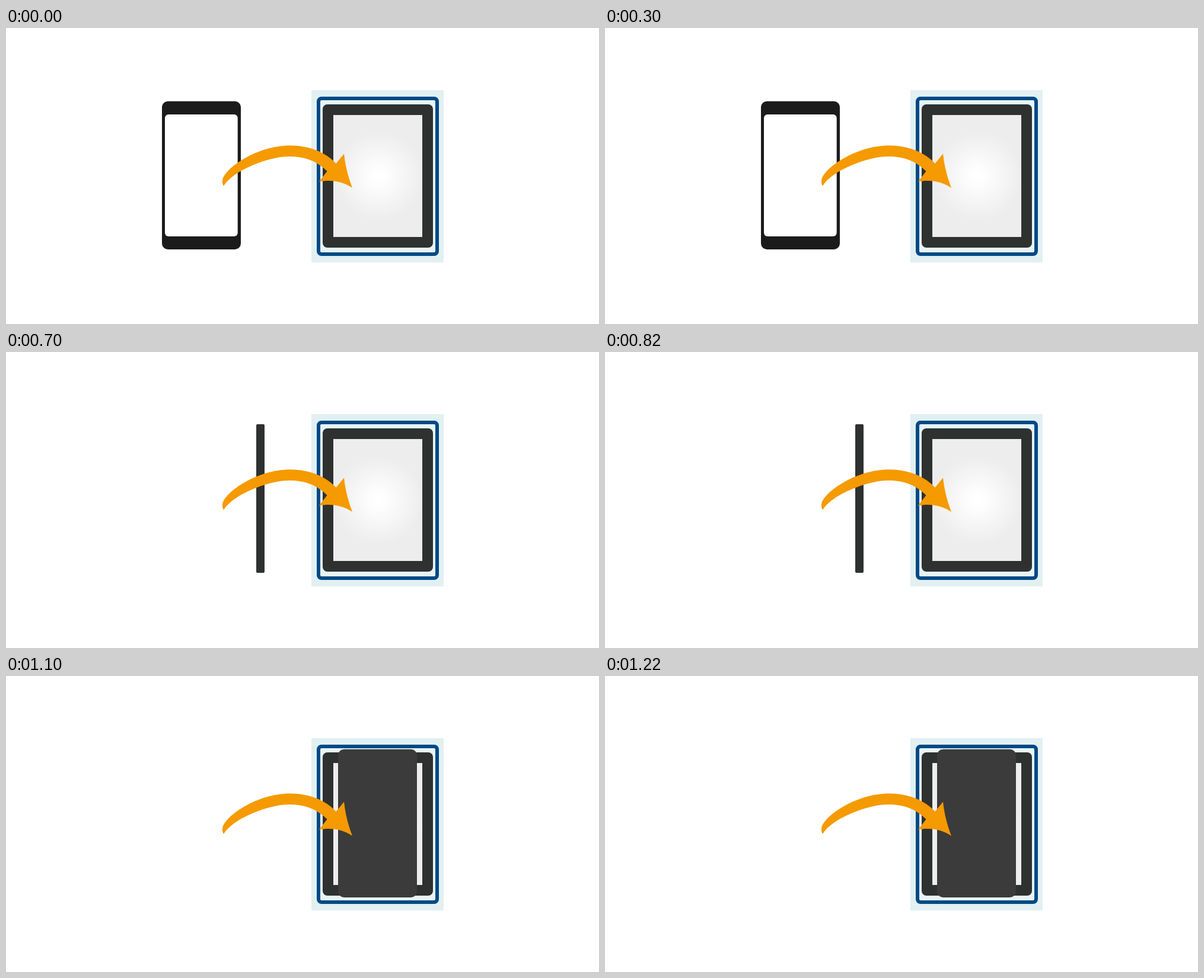
An HTML page for the animation above (1300 ms loop, 1000 by 500 pixels).

```html
<!DOCTYPE html>
<html lang="en">
<head>
<meta charset="utf-8">
<title>Phone turning onto a reader</title>
<style>
  html, body { margin: 0; width: 100%; height: 100%; overflow: hidden; background: #fff; }
  svg { display: block; width: 100%; height: 100%; }

  /* Hard pose changes at 500, 700, 900 and 1100 ms of a 1300 ms loop */
  .pose, .arrow { visibility: hidden; animation: 1300ms step-end infinite; }
  .front { animation-name: front; }
  .turned { animation-name: turned; }
  .edge { animation-name: edge; }
  .turned-back { animation-name: turned-back; }
  .back { animation-name: back; }
  .arrow { animation-name: blink; }

  @keyframes front { 0% { visibility: visible } 38.4615%, 100% { visibility: hidden } }
  @keyframes turned { 0% { visibility: hidden } 38.4615% { visibility: visible } 53.8461%, 100% { visibility: hidden } }
  @keyframes edge { 0% { visibility: hidden } 53.8461% { visibility: visible } 69.2307%, 100% { visibility: hidden } }
  @keyframes turned-back { 0% { visibility: hidden } 69.2307% { visibility: visible } 84.6153%, 100% { visibility: hidden } }
  @keyframes back { 0% { visibility: hidden } 84.6153%, 100% { visibility: visible } }
  @keyframes blink {
    0%, 53.8461% { visibility: visible }
    38.4615%, 69.2307% { visibility: hidden }
    84.6153%, 100% { visibility: visible }
  }
</style>
</head>
<body>
<svg viewBox="0 0 1000 500">
  <defs>
    <radialGradient id="glow" gradientUnits="userSpaceOnUse" cx="628" cy="250" r="75">
      <stop offset="0" stop-color="#fff"/>
      <stop offset=".15" stop-color="#fefefe"/>
      <stop offset="1" stop-color="#ededed"/>
    </radialGradient>
    <path id="slab" d="M288 166Q288 157 296 154L403 126.2Q412 124.5 412 134V362Q411 374 401 378L300 404.6Q288 406.5 288 399Z"/>
  </defs>

  <!-- Reader -->
  <rect x="515" y="105" width="223" height="291" fill="#e1f0f2"/>
  <rect x="527" y="119" width="200" height="263" rx="5" fill="#e6f5f7" stroke="#004986" stroke-width="6"/>
  <rect x="534" y="129" width="186" height="242" rx="8" fill="#2f3130"/>
  <rect x="552" y="147" width="150" height="206" fill="url(#glow)"/>

  <!-- Phone -->
  <g class="pose front">
    <rect x="263" y="123.7" width="133" height="250.3" rx="10" fill="#1b1b1b"/>
    <rect x="268" y="146" width="122.7" height="206" rx="6" fill="#fff"/>
  </g>
  <g class="pose turned">
    <use href="#slab" fill="#3b3b3b"/>
    <path fill="#1b1b1b" d="M295 166Q295 156 303 152.2L403 126.2Q412 124.5 412 134V361Q411 373 401 377L304 403Q295 405 295 395Z"/>
    <path fill="#fff" d="M299.7 182Q300 176 305 174.5L402 149Q407 148 407 154V348Q407 353.5 402 355L305 380.5Q299.7 381.5 299.7 375Z"/>
  </g>
  <rect class="pose edge" x="422" y="122" width="14" height="251" rx="2" fill="#2f3130"/>
  <use class="pose turned-back" href="#slab" fill="#3b3b3b" transform="translate(865) scale(-1 1)"/>
  <rect class="pose back" x="560" y="123.7" width="133" height="250.3" rx="10" fill="#3b3b3b"/>

  <path class="arrow" fill="#f59a00" d="M365 258C366 239 422 198 480 198.5C514 199 540 211 556.5 229L570 212.5C572 232 577 252 584 270C568 259 548 255.5 528 259.5L541.5 242C525 225 505 217 478 217C440 217 380 243 367 267C365.5 264 364.5 261 365 258Z"/>
</svg>
</body>
</html>
```
